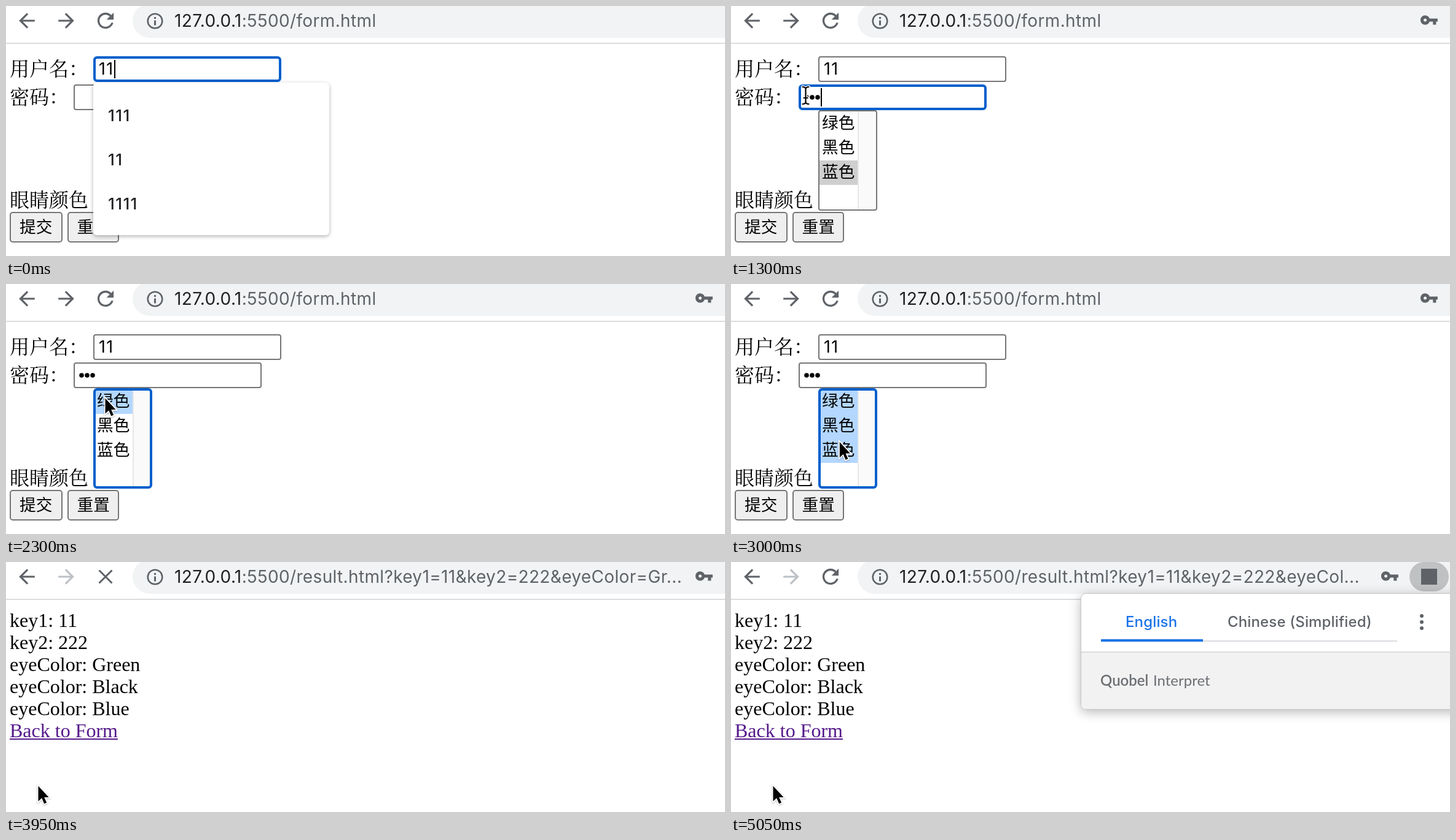
Recreate the animation shown at these times as an HTML page. Size 1170x408 px, loop 5.25 s.

```html
<!DOCTYPE html>
<html lang="en">
<head>
<meta charset="utf-8">
<style>
  html, body { margin: 0; width: 100%; height: 100%; overflow: hidden; background: #fff; }
  svg { display: block; width: 1170px; height: 408px; }
  text { white-space: pre; }
  .ui { font: 26.67px Inter, "Noto Sans CJK SC", "Noto Sans CJK", sans-serif; }
  .url { font: 28px Inter, sans-serif; letter-spacing: .35px; fill: #5f6368; }
  .label { font: 500 32px "Noto Serif CJK SC", "Noto Sans CJK SC", "Noto Sans CJK", serif; }
  .page { font: 32px "Liberation Serif", serif; }
  .hint { font: 500 26px Inter, sans-serif; fill: #202124; }
  .digits { letter-spacing: 1.4px; }
  .tab { font: 500 24px Inter, sans-serif; letter-spacing: .15px; fill: #5f6368; }
  .brand { font: 24px Lato, sans-serif; fill: #6b6f73; }
  .icon { fill: #5f6368; }
  .box { fill: #fff; stroke: #767676; stroke-width: 2; }
  .box.focus { stroke: #005fcc; stroke-width: 4; }
  .button { fill: #efefef; stroke: #767676; stroke-width: 2; }
  .button.hover { fill: #e5e5e5; stroke: #4f4f4f; }
  .button.active { fill: #f5f5f5; stroke: #8d8d8d; }
  #hints { filter: drop-shadow(0 2px 3px rgba(0, 0, 0, .3)); }
  #panel { filter: drop-shadow(0 4px 9px rgba(0, 0, 0, .28)); }
  #pointer { filter: drop-shadow(0 1px 1px rgba(0, 0, 0, .3)); }
</style>
</head>
<body>
<svg viewBox="0 0 1170 408">
  <!-- toolbar -->
  <path d="M0 61H1170" stroke="#dadce0" stroke-width="2"/>
  <rect x="206" y="-4" width="1100" height="56" rx="28" fill="#f1f3f4"/>
  <defs>
    <path id="arrow" d="M20 11H7.83l5.59-5.59L12 4l-8 8 8 8 1.41-1.41L7.83 13H20v-2z"/>
  </defs>
  <use href="#arrow" class="icon" transform="translate(14.8 4.8) scale(1.6)"/>
  <use href="#arrow" id="forward" transform="translate(117.2 4.8) scale(-1.6 1.6)"/>
  <path id="reload" class="icon" transform="translate(142.3 4.3) scale(1.64)" d="M17.65 6.35C16.2 4.9 14.21 4 12 4c-4.42 0-7.99 3.58-7.99 8s3.57 8 7.99 8c3.73 0 6.84-2.55 7.73-6h-2.08c-.82 2.33-3.04 4-5.65 4-3.31 0-6-2.69-6-6s2.69-6 6-6c1.66 0 3.14.69 4.22 1.78L13 11h7V4l-2.35 2.35z"/>
  <path id="stop" d="M151.5 13.5l21 21m0-21l-21 21" stroke="#5f6368" stroke-width="3"/>
  <g class="icon">
    <circle cx="242.5" cy="24.5" r="11.8" fill="none" stroke="#5f6368" stroke-width="2.6"/>
    <path d="M241 18h3v3h-3zm0 5.5h3v8h-3z"/>
  </g>
  <text class="url" x="274" y="34"><tspan fill="#202124">127.0.0.1</tspan><tspan id="path"></tspan></text>
  <path id="key" class="icon" d="M12.65 10C11.83 7.67 9.61 6 7 6c-3.31 0-6 2.69-6 6s2.69 6 6 6c2.61 0 4.83-1.67 5.65-4H17v4h4v-4h2v-4H12.65zM7 14c-1.1 0-2-.9-2-2s.9-2 2-2 2 .9 2 2-.9 2-2 2z"/>

  <!-- form page -->
  <g id="form">
    <g class="label">
      <text x="6" y="114">用户名：</text>
      <text x="6" y="160">密码：</text>
      <text x="6" y="328">眼睛颜色</text>
    </g>
    <rect id="user" class="box"/>
    <text class="ui digits" x="151" y="112">11</text>
    <rect id="pass" class="box"/>
    <g id="dots"></g>
    <rect id="caret" width="2" height="30"/>
    <rect x="143" y="171" width="94" height="162" rx="3" fill="#fff"/>
    <path d="M207 172h29v160h-29z" fill="#fafafa"/>
    <path d="M207 172v160" stroke="#e8e8e8" stroke-width="2"/>
    <g id="rows"></g>
    <rect id="list" class="box" style="fill:none"/>
    <rect id="submit" class="button" x="7" y="337" width="84" height="48" rx="4"/>
    <rect class="button" x="101" y="337" width="82" height="48" rx="4"/>
    <text class="ui" x="22" y="370">提交</text>
    <text class="ui" x="115.5" y="370">重置</text>
    <g id="hints">
      <rect x="142" y="125" width="384" height="249" rx="6" fill="#fff"/>
      <text class="hint digits" x="166" y="188">111</text>
      <text class="hint digits" x="166" y="260">11</text>
      <text class="hint digits" x="166" y="332">1111</text>
    </g>
  </g>

  <!-- result page -->
  <g id="result" class="page">
    <text x="6" y="106">key1: 11</text>
    <text x="6" y="142">key2: 222</text>
    <text x="6" y="178">eyeColor: Green</text>
    <text x="6" y="214">eyeColor: Black</text>
    <text x="6" y="250">eyeColor: Blue</text>
    <text x="6" y="286" fill="#551a8b">Back to Form</text>
    <path d="M6 289H182" stroke="#551a8b" stroke-width="2"/>
  </g>

  <!-- translation panel -->
  <g id="translate">
    <rect x="1104" y="0" width="64" height="48" rx="24" fill="#bfc1c3"/>
    <rect class="icon" x="1123" y="11" width="26" height="26"/>
    <g id="panel">
      <rect x="569.5" y="51.5" width="640" height="189" rx="8" fill="#fff" stroke="#c6c6c6"/>
      <path d="M570 147h600v93H578q-8 0-8-8z" fill="#f2f2f2"/>
      <path d="M570 147h600M768 129h316" stroke="#dadce0" stroke-width="2"/>
      <path d="M602 128h166" stroke="#1a73e8" stroke-width="4"/>
    </g>
    <text class="tab" x="642" y="106" style="fill:#1a73e8">English</text>
    <text class="tab" x="808" y="106">Chinese (Simplified)</text>
    <g class="icon"><circle cx="1124" cy="88" r="3"/><circle cx="1124" cy="98" r="3"/><circle cx="1124" cy="108" r="3"/></g>
    <text class="brand" x="601" y="202" font-weight="600"><tspan font-weight="600">Quobel</tspan></text>
    <text class="brand" x="687" y="202">Interpret</text>
  </g>

  <g id="cursor">
    <path id="pointer" transform="translate(1.5 2.5) scale(.88)" d="M0 0V28.5L6.5 22.5L11 33L15.5 31L11 21H19.5Z" stroke="#fff" stroke-width="4" paint-order="stroke"/>
    <g id="beam" fill="none" stroke-linecap="round">
      <path d="M-5-14Q0-14 0-10Q0-14 5-14M0-10V10M-5 14Q0 14 0 10Q0 14 5 14M-3 4H3" stroke="#fff" stroke-width="5"/>
      <path d="M-5-14Q0-14 0-10Q0-14 5-14M0-10V10M-5 14Q0 14 0 10Q0 14 5 14M-3 4H3" stroke="#000" stroke-width="2.2"/>
    </g>
  </g>
</svg>
<script>
const LOOP = 5250, STEP = 50;
const $ = id => document.getElementById(id);
const show = (id, on) => $(id).style.display = on ? '' : 'none';
const set = (el, attrs) => { for (const k in attrs) el.setAttribute(k, attrs[k]); };

// pointer stops: time, x, y
const stops = [
  [50, 215, 108], [600, 121.5, 146], [1300, 121.5, 146], [1750, 172, 276],
  [1800, 173, 278], [2250, 160, 184], [2400, 160, 184], [2600, 176, 255],
  [2980, 176, 255], [3450, 51, 363], [4450, 51, 363], [4650, 67, 363], [LOOP, 67, 363]
];

$('rows').innerHTML = ['绿色', '黑色', '蓝色'].map((name, i) =>
  `<rect x="144" y="${172 + i * 40}" width="62" height="40"/>
   <text class="ui" x="148" y="${200 + i * 40}">${name}</text>`).join('');
$('dots').innerHTML = [123, 132, 141].map(x => `<circle cx="${x}" cy="149" r="3.8"/>`).join('');
const rows = $('rows').querySelectorAll('rect');

function pointerAt(t) {
  const i = Math.max(1, stops.findIndex(s => s[0] >= t));
  const [t0, x0, y0] = stops[i - 1], [t1, x1, y1] = stops[i];
  const p = Math.min(1, Math.max(0, (t - t0) / (t1 - t0)));
  const e = p * p * (3 - 2 * p);
  return [x0 + (x1 - x0) * e, y0 + (y1 - y0) * e];
}

function box(id, x, y, w, h, focused) {
  const inset = focused ? 2 : 1;
  $(id).classList.toggle('focus', focused);
  set($(id), { x: x + inset, y: y + inset, width: w - 2 * inset, height: h - 2 * inset, rx: focused ? 4 : 3 });
}

function draw(t) {
  const done = t >= 3900, translated = t >= 4100, loading = done && t < 4050;
  const [x, y] = pointerAt(t);
  const focus = t < 600 ? 'user' : t < 2300 ? 'pass' : t < 3550 ? 'list' : '';

  // toolbar
  $('forward').setAttribute('fill', done ? '#bdc1c6' : '#5f6368');
  show('reload', !loading);
  show('stop', loading);
  $('path').textContent = ':5500/' + (!done ? 'form.html' :
    'result.html?key1=11&key2=222&eyeCol' + (translated ? '...' : 'or=Gr...'));
  show('key', t >= 1000);
  $('key').setAttribute('transform', `translate(${translated ? 1056.7 : 1120.7} 7.7) scale(1.27)`);
  show('form', !done);
  show('result', done);
  show('translate', translated);
  $('translate').style.opacity = Math.min(1, (t - 4050) / 200);

  // fields
  box('user', 142, 82, 306, 42, focus === 'user');
  box('pass', 110, 128, 306, 42, focus === 'pass');
  box('list', 142, 170, 96, 164, focus === 'list');
  const typed = [1000, 1100, 1150].filter(k => t >= k).length;
  [...$('dots').children].forEach((dot, i) => dot.style.display = i < typed ? '' : 'none');
  show('caret', focus === 'user' || focus === 'pass');
  set($('caret'), focus === 'user' ? { x: 176, y: 88 } : { x: 119 + typed * 9, y: 134 });
  show('hints', t < 600);

  // dragging down the list extends the selection
  const last = t >= 2600 ? 2 : Math.floor((y - 172) / 40);
  rows.forEach((row, i) => {
    const on = t < 2300 ? i === 2 : i <= last;
    row.setAttribute('fill', !on ? 'none' : focus === 'list' ? '#b3d7ff' : '#cfcfcf');
  });
  const over = x < 92 && y > 336;
  $('submit').setAttribute('class', 'button' + (t >= 3550 && t < 3850 ? ' active' : over ? ' hover' : ''));

  // the pointer hides while keys are pressed
  const beam = y < 170 && !(t < 600 && x > 142 && y > 124);
  show('cursor', t >= 50 && !(t >= 800 && t < 1300));
  show('beam', beam);
  show('pointer', !beam);
  $('cursor').setAttribute('transform', `translate(${x} ${y})`);
}

function tick() {
  const t = performance.now() % LOOP;
  draw(Math.floor(t / STEP) * STEP);
  requestAnimationFrame(tick);
}
tick();
</script>
</body>
</html>
```
